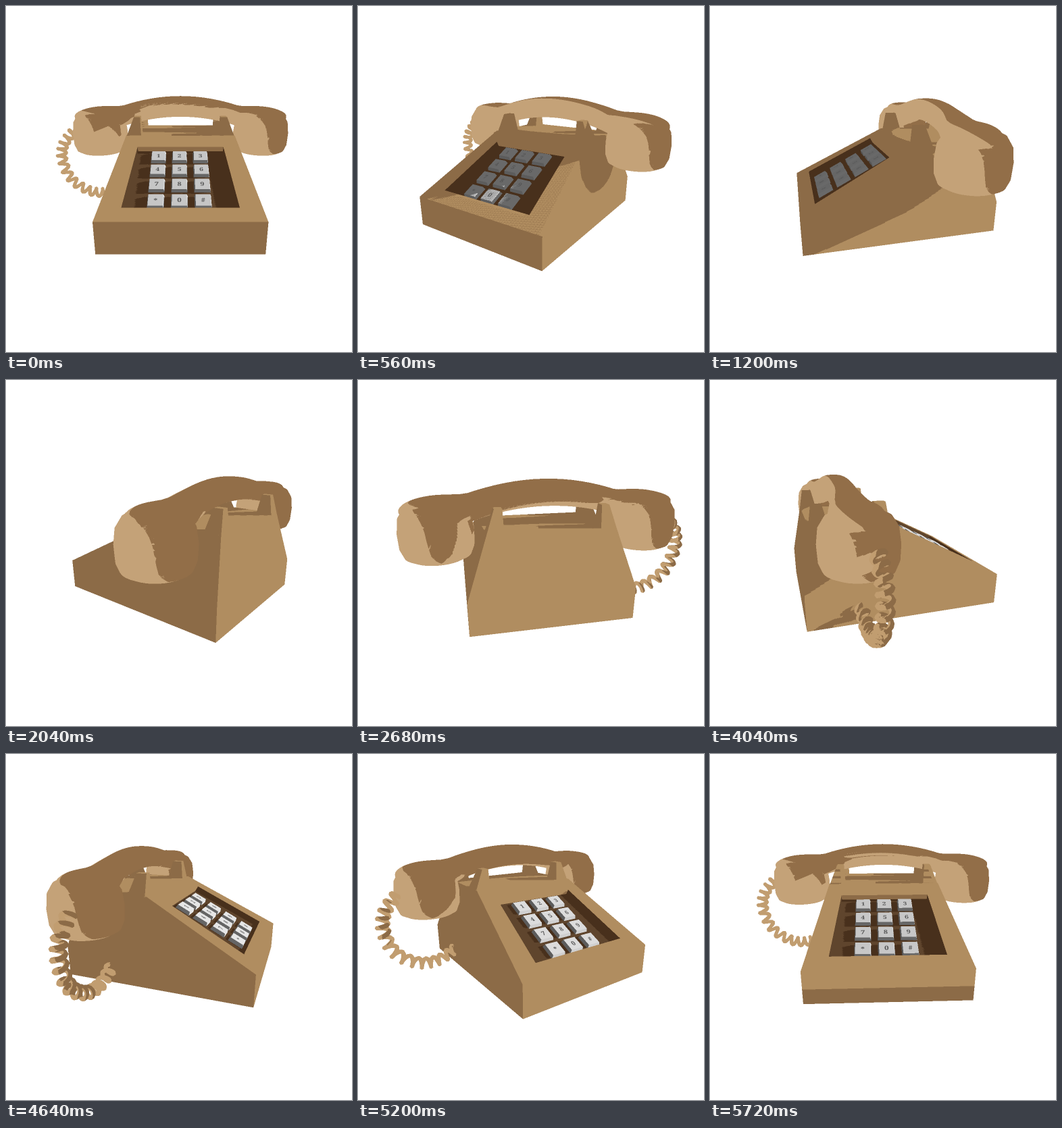
These frames come from a looping animation (512 px wide and 512 px high, 5.76 s). An HTML page with a canvas:

```html
<!DOCTYPE html>
<html lang="en">
<head>
<meta charset="utf-8">
<title>Turning telephone</title>
<style>
html, body { margin: 0; height: 100%; overflow: hidden; background: #fff; }
canvas { display: block; width: 100vw; height: 100vh; }
</style>
</head>
<body>
<canvas id="stage" width="512" height="512"></canvas>
<script>
const LOOP = 5760, STEP = 40, SIZE = 512, SS = 2, W = SIZE * SS;
const { sin, cos, abs, sign, min, max, sqrt, floor, ceil, PI } = Math;

// ---- vector helpers ----
const add = (a, b, k = 1) => [a[0] + b[0] * k, a[1] + b[1] * k, a[2] + b[2] * k];
const dot = (a, b) => a[0] * b[0] + a[1] * b[1] + a[2] * b[2];
const cross = (a, b) => [a[1] * b[2] - a[2] * b[1], a[2] * b[0] - a[0] * b[2], a[0] * b[1] - a[1] * b[0]];
const unit = a => { const l = sqrt(dot(a, a)) || 1; return a.map(v => v / l); };
const mean = pts => pts.reduce((s, p) => add(s, p, 1 / pts.length), [0, 0, 0]);

// ---- materials: the handset and cord use inverted tones ----
const rgb = (r, g, b) => (0xff000000 | b << 16 | g << 8 | r) >>> 0;
const BODY = 0, HANDSET = 1, WELL = 2, KEY = 3, CORD = 4;
const lightTone = [rgb(176, 141, 96), rgb(146, 110, 72), rgb(95, 69, 45), 0, rgb(140, 107, 71)];
const darkTone = [rgb(140, 107, 71), rgb(196, 162, 120), rgb(72, 48, 28), 0, rgb(193, 157, 112)];

// ---- mesh ----
const pos = [], nor = [], tris = [];

function vertex(p, n) {
  pos.push(p);
  nor.push(n);
  return pos.length - 1;
}

function face(pts, mat, hub = [0, 0.5, 0], dir = 1, bend = 0) {
  let n = unit(cross(add(pts[1], pts[0], -1), add(pts[2], pts[0], -1)));
  if (dot(n, add(mean(pts), hub, -1)) * dir < 0) n = n.map(v => -v);
  const [a, b, c, d] = pts.map((p, i) => vertex(p, [n[0], n[1] + (i < 2 ? -bend : bend), n[2]]));
  tris.push([a, b, c, mat], [a, c, d, mat]);
}

function frustum(base, top, mat) {
  const hub = mean([...base, ...top]);
  base.forEach((p, i) => {
    const j = (i + 1) % 4;
    face([p, base[j], top[j], top[i]], mat, hub);
  });
  face(top, mat, hub);
}

function grid(f, nu, nv, mat) {
  const first = pos.length, eu = 0.1 / nu, ev = 0.1 / nv;
  for (let i = 0; i <= nu; i++) for (let j = 0; j <= nv; j++) {
    const u = i / nu, v = j / nv;
    const du = add(f(min(1, u + eu), v), f(max(0, u - eu), v), -1);
    const dv = add(f(u, v + ev), f(u, v - ev), -1);
    vertex(f(u, v), unit(cross(du, dv)));
  }
  for (let i = 0; i < nu; i++) for (let j = 0; j < nv; j++) {
    const a = first + i * (nv + 1) + j, b = a + nv + 1;
    tris.push([a, b, b + 1, mat], [a, b + 1, a + 1, mat]);
  }
}

// ---- body ----
const LIP = 0.415, TOP = 1.135, FRONT = 1.25, CREASE = -0.15, REAR = -1.12;
const slope = (x, s, lift = 0) =>
  [x, LIP + (TOP - LIP) * s + 0.889 * lift, FRONT + (CREASE - FRONT) * s + 0.457 * lift];

face([[-1, 0, FRONT], [1, 0, FRONT], [1, LIP, FRONT], [-1, LIP, FRONT]], BODY, undefined, 1, 0.02);
face([[-1, 0, -FRONT], [1, 0, -FRONT], [1, LIP, -FRONT], [-1, LIP, -FRONT]], BODY);
face([[-1, LIP, -FRONT], [1, LIP, -FRONT], [0.75, TOP, REAR], [-0.75, TOP, REAR]], BODY);
face([[-0.797, TOP, CREASE], [0.797, TOP, CREASE], [0.75, TOP, REAR], [-0.75, TOP, REAR]], BODY);
for (const m of [-1, 1]) {
  face([[m, 0, FRONT], [m, 0, -FRONT], [m, LIP, -FRONT], [m, LIP, FRONT]], BODY);
  face([[m, LIP, FRONT], [m, LIP, -FRONT], [m * 0.75, TOP, REAR], [m * 0.797, TOP, CREASE]], BODY);
}

// slope with the sunken key field
const outer = [[-1, 0], [1, 0], [0.797, 1], [-0.797, 1]];
const inner = [[-0.7, 0.135], [0.7, 0.135], [0.606, 0.84], [-0.606, 0.84]];
const DEEP = -0.08;
for (let i = 0; i < 4; i++) {
  const j = (i + 1) % 4;
  face([slope(...outer[i]), slope(...outer[j]), slope(...inner[j]), slope(...inner[i])], BODY);
  face([slope(...inner[i]), slope(...inner[j]), slope(...inner[j], DEEP), slope(...inner[i], DEEP)],
    i === 2 ? BODY : WELL, slope(0, 0.5, DEEP / 2), -1);
}
face(inner.map(p => slope(...p, DEEP)), WELL);

// keys
const KEY_TOP = -0.03;
const keys = [..."123456789*0#"].map((label, i) =>
  ({ label, x: -0.305 + (i % 3) * 0.291, s: 0.745 - floor(i / 3) * 0.172 }));
const pad = ({ x, s }, half, lift) => [[-1, -1], [1, -1], [1, 1], [-1, 1]]
  .map(([a, b]) => slope(x + a * half, s + b * half * 0.64, lift));
for (const k of keys) frustum(pad(k, 0.104, DEEP), pad(k, 0.092, KEY_TOP), KEY);

// cradle prongs
const rect = (x0, x1, z0, z1, y) => [[x0, y, z0], [x1, y, z0], [x1, y, z1], [x0, y, z1]];
for (const m of [-1, 1]) {
  frustum(rect(m * 0.58, m * 0.79, -0.18, -0.42, TOP), rect(m * 0.59, m * 0.68, -0.2, -0.34, 1.4), BODY);
  frustum(rect(m * 0.56, m * 0.75, REAR, -0.9, TOP), rect(m * 0.57, m * 0.66, -1.08, -0.96, 1.4), BODY);
}

// ---- handset ----
const MID = -0.68;
const boxy = v => sign(v) * abs(v) ** 0.68;
grid((u, v) => {
  const x = -1.68 * cos(PI * u), far = abs(x), a = 2 * PI * v;
  const k = far > 1.2 ? sqrt(max(0, 1 - ((far - 1.2) / 0.48) ** 2)) : 1;
  const g = min(1, max(0, (far - 0.55) / 0.65));
  const wide = 0.175 + 0.11 * g * g * (3 - 2 * g);
  const y = 1.505 - 0.16 * min(1, far / 0.95) ** 2;
  return [x, y + 0.157 * k * boxy(sin(a)), MID + wide * k * boxy(cos(a))];
}, 44, 32, HANDSET);

const cup = [[0, 0.77], [0.31, 0.78], [0.385, 0.82], [0.425, 0.92], [0.433, 1.1], [0.41, 1.27], [0.34, 1.38], [0.2, 1.45], [0, 1.47]];
for (const m of [-1, 1]) grid((u, v) => {
  const t = u * (cup.length - 1), i = min(cup.length - 2, floor(t)), k = t - i;
  const r = cup[i][0] + (cup[i + 1][0] - cup[i][0]) * k;
  const y = cup[i][1] + (cup[i + 1][1] - cup[i][1]) * k;
  return [m * 1.29 + r * cos(2 * PI * v), y, MID + r * sin(2 * PI * v)];
}, 16, 32, HANDSET);

// ---- coiled cord ----
const line = [[-1.7, 1.12], [-1.88, 0.92], [-1.93, 0.66], [-1.82, 0.33], [-1.54, 0.12], [-1.25, 0.09], [-1, 0.2]];
function along(t) {
  const n = line.length - 1, i = min(n - 1, max(0, floor(t * n))), k = t * n - i;
  const at = j => line[min(n, max(0, j))];
  return [0, 1].map(c => {
    const [a, b, d, e] = [at(i - 1)[c], at(i)[c], at(i + 1)[c], at(i + 2)[c]];
    return b + k * (d - a + k * (2 * a - 5 * b + 4 * d - e + k * (3 * (b - d) + e - a))) / 2;
  });
}
const TURNS = 15;
function coil(t) {
  const p = along(t), a = along(t - 0.002), b = along(t + 0.002);
  const [tx, ty] = unit([b[0] - a[0], b[1] - a[1], 0]);
  const w = 2 * PI * TURNS * t;
  const out = [-ty * cos(w), tx * cos(w), sin(w)];
  return { out, at: add([p[0], p[1], -0.6], out, 0.066) };
}
grid((u, v) => {
  const { out, at } = coil(u);
  const t = unit(add(coil(u + 0.0005).at, coil(u - 0.0005).at, -1));
  const side = cross(t, out), a = 2 * PI * v;
  return add(add(at, out, 0.03 * cos(a)), side, -0.03 * sin(a));
}, TURNS * 14, 6, CORD);

// ---- camera and light ----
const CAM = { x: 258.2, y: 255.7, f: 497.6, c: 0.9505, s: 0.311, h: 2.07, z: 4.728 };
const LIGHT = unit([1, 0.37, -0.043]);
const LU = unit([LIGHT[2], 0, -LIGHT[0]]), LV = cross(LIGHT, LU);
const MAP = 700, SPAN = 5.2, BIAS = 0.05;

const count = pos.length;
const [sx, sy, iz, lit, lu, lv, lw] = Array.from({ length: 7 }, () => new Float64Array(count));
const depth = new Float32Array(W * W), shade = new Float32Array(MAP * MAP);

const turn = (p, c, s) => [p[0] * c - p[2] * s, p[1], p[0] * s + p[2] * c];
function project([x, y, z]) {
  const d = CAM.c * (CAM.z - z) + CAM.s * (CAM.h - y);
  return [CAM.x + CAM.f * x / d, CAM.y + CAM.f * ((CAM.h - y) * CAM.c - (CAM.z - z) * CAM.s) / d, 1 / d];
}

function fill(X, Y, a, b, c, size, put) {
  const ax = X[a], ay = Y[a], bx = X[b], by = Y[b], cx = X[c], cy = Y[c];
  const area = (bx - ax) * (cy - ay) - (cx - ax) * (by - ay);
  if (abs(area) < 1e-7) return;
  const x0 = max(0, ceil(min(ax, bx, cx) - 0.5)), x1 = min(size - 1, floor(max(ax, bx, cx) - 0.5));
  const y0 = max(0, ceil(min(ay, by, cy) - 0.5)), y1 = min(size - 1, floor(max(ay, by, cy) - 0.5));
  const d0 = (by - cy) / area, d1 = (cy - ay) / area, px = x0 + 0.5, e = -1e-9;
  for (let y = y0; y <= y1; y++) {
    const py = y + 0.5;
    let w0 = ((bx - px) * (cy - py) - (cx - px) * (by - py)) / area;
    let w1 = ((cx - px) * (ay - py) - (ax - px) * (cy - py)) / area;
    for (let x = x0, i = y * size + x0; x <= x1; x++, i++, w0 += d0, w1 += d1) {
      const w2 = 1 - w0 - w1;
      if (w0 >= e && w1 >= e && w2 >= e) put(i, w0, w1, w2);
    }
  }
}

// ---- drawing ----
const ctx = document.getElementById("stage").getContext("2d");
const big = document.createElement("canvas");
big.width = big.height = W;
const bigCtx = big.getContext("2d");
const image = bigCtx.createImageData(W, W);
const pix = new Uint32Array(image.data.buffer);

function place(c, s) {
  const L = turn(LIGHT, c, -s);
  for (let i = 0; i < count; i++) {
    const p = turn(pos[i], c, s), q = project(p);
    sx[i] = q[0] * SS;
    sy[i] = q[1] * SS;
    iz[i] = q[2];
    lit[i] = dot(nor[i], L);
    p[1] -= 0.8;
    lu[i] = (dot(p, LU) / SPAN + 0.5) * MAP;
    lv[i] = (dot(p, LV) / SPAN + 0.5) * MAP;
    lw[i] = dot(p, LIGHT);
  }
}

function castShadows() {
  shade.fill(-99);
  let a, b, c;
  const put = (i, w0, w1, w2) => {
    const w = w0 * lw[a] + w1 * lw[b] + w2 * lw[c];
    if (w > shade[i]) shade[i] = w;
  };
  for (const t of tris) {
    [a, b, c] = t;
    fill(lu, lv, a, b, c, MAP, put);
  }
}

function paint() {
  depth.fill(0);
  pix.fill(0xffffffff);
  let a, b, c, mat;
  const put = (i, w0, w1, w2) => {
    w0 *= iz[a]; w1 *= iz[b]; w2 *= iz[c];
    const q = w0 + w1 + w2;
    if (q <= depth[i]) return;
    depth[i] = q;
    w0 /= q; w1 /= q; w2 /= q;
    const d = w0 * lit[a] + w1 * lit[b] + w2 * lit[c];
    let on = d > 0;
    if (on) {
      const u = floor(w0 * lu[a] + w1 * lu[b] + w2 * lu[c]);
      const v = floor(w0 * lv[a] + w1 * lv[b] + w2 * lv[c]);
      on = shade[v * MAP + u] < w0 * lw[a] + w1 * lw[b] + w2 * lw[c] + BIAS;
    }
    if (mat === KEY) {
      const g = on ? min(230, 172 + 90 * d) : 105 + 20 * min(d, 0);
      pix[i] = rgb(g, g, g);
    } else pix[i] = on ? lightTone[mat] : darkTone[mat];
  };
  for (const t of tris) {
    [a, b, c, mat] = t;
    fill(sx, sy, a, b, c, W, put);
  }
}

function drawLabels(c, s) {
  if (c < 0.2) return;
  const em = 0.0095;
  ctx.fillStyle = "#555";
  ctx.font = "bold 10px 'Noto Serif', 'Liberation Serif', serif";
  ctx.textAlign = "center";
  for (const k of keys) {
    const at = (x, down) => project(turn(slope(k.x + x, k.s - down / 1.574, KEY_TOP), c, s));
    const o = at(0, 0), r = at(em, 0), d = at(0, em);
    ctx.setTransform(r[0] - o[0], r[1] - o[1], d[0] - o[0], d[1] - o[1], o[0], o[1]);
    ctx.fillText(k.label, 0, k.label === "*" ? 5 : 3.6);
  }
  ctx.setTransform(1, 0, 0, 1, 0, 0);
}

function draw(step) {
  const angle = step * STEP / LOOP * 2 * PI, c = cos(angle), s = sin(angle);
  place(c, s);
  castShadows();
  paint();
  bigCtx.putImageData(image, 0, 0);
  ctx.imageSmoothingQuality = "high";
  ctx.drawImage(big, 0, 0, SIZE, SIZE);
  drawLabels(c, s);
}

const start = performance.now();
let shown = -1;
function tick() {
  const step = floor((performance.now() - start) % LOOP / STEP);
  if (step !== shown) draw(shown = step);
  requestAnimationFrame(tick);
}
tick();
</script>
</body>
</html>
```
